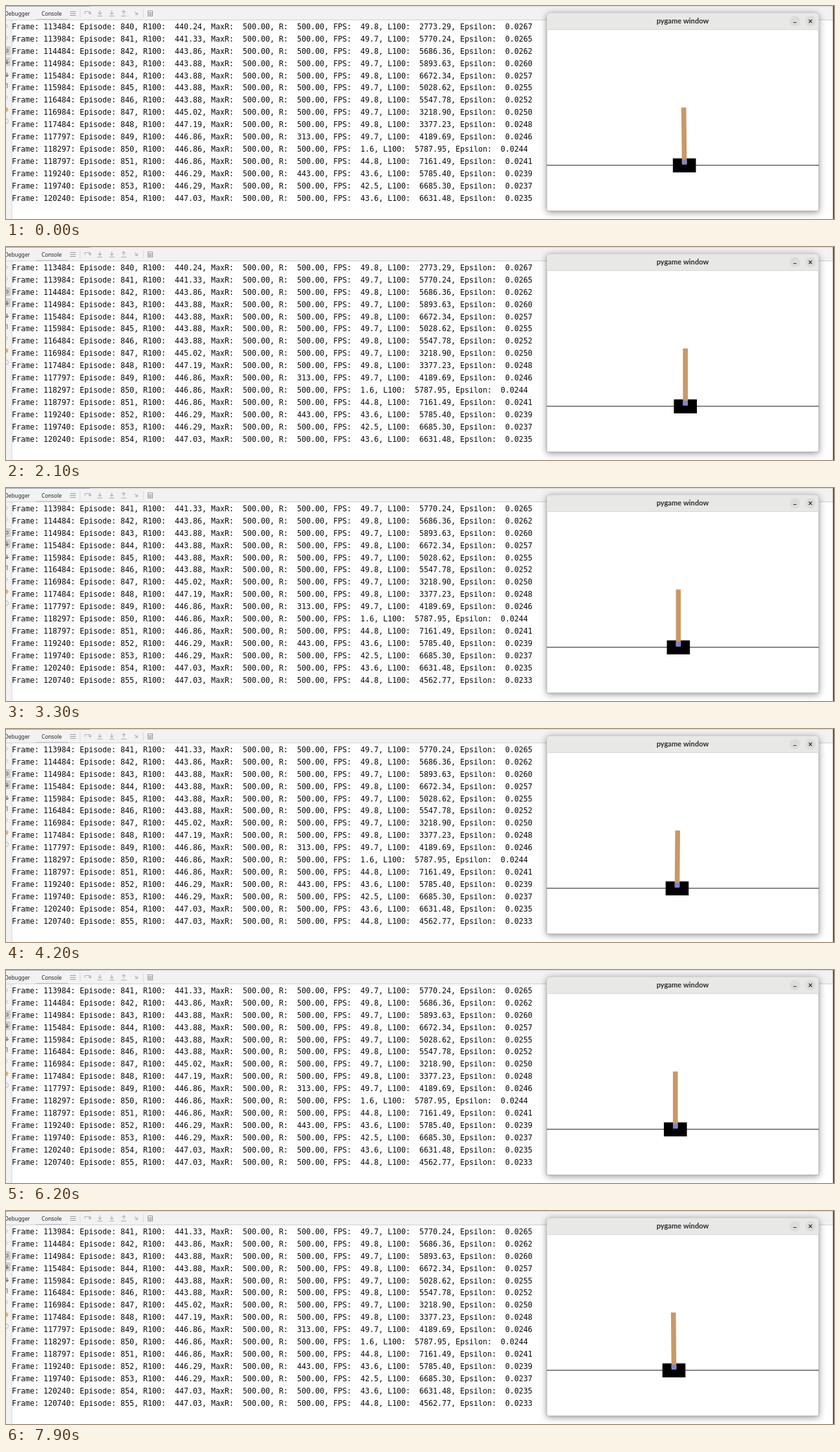
Write an HTML page with a canvas that moves like this. It is 1280 px wide and 329 px high and loops after 8 s.

```html
<!DOCTYPE html>
<html lang="en">
<head>
<meta charset="utf-8">
<title>Cart pole training</title>
<style>
  html, body { margin: 0; width: 100%; height: 100%; overflow: hidden; background: #fff; }
  canvas { display: block; }
</style>
</head>
<body>
<canvas id="stage" width="1280" height="329"></canvas>
<script>
const ctx = document.getElementById('stage').getContext('2d');
const LOOP = 8000, STEP = 100, RESET = 3100;
const VISIBLE_ROWS = 15;

function seeded(seed) {
  return () => (seed = (seed * 16807) % 2147483647) / 2147483647;
}

function framesPerSecond(episode) {
  if (episode < 850) return episode % 2 ? 49.7 : 49.8;
  if (episode === 850) return 1.6;
  return 43.65 + 1.15 * Math.cos((episode - 851) * Math.PI / 2);
}

// Every episode scores 500 unless listed; the mean runs over the last 100 episodes.
function trainingLog() {
  const FULL = 500, firstFrame = 113484;
  const shortRuns = { 849: 313, 852: 443 };
  const droppedRuns = { 841: 391, 842: 247, 843: 498, 847: 386, 848: 283, 849: 346, 854: 426 };
  const random = seeded(4711);
  const lines = [];
  let frame = firstFrame, mean = 440.24;
  for (let episode = 840; episode <= 855; episode++) {
    const reward = shortRuns[episode] || FULL;
    if (episode > 840) {
      frame += reward;
      mean += (reward - (droppedRuns[episode] || FULL)) / 100;
    }
    const loss = 2600 + 4700 * random();
    const epsilon = 0.02671 * Math.exp((firstFrame - frame) / 52500);
    lines.push(`Frame: ${frame}: Episode: ${episode}, R100:  ${mean.toFixed(2)}, MaxR:  500.00, ` +
      `R:  ${reward.toFixed(2)}, FPS:  ${framesPerSecond(episode).toFixed(1)}, ` +
      `L100:  ${loss.toFixed(2)}, Epsilon:  ${epsilon.toFixed(4)}`);
  }
  return lines;
}
const log = trainingLog();

// Cart centre and sideways offset of the pole tip.
function pose(t) {
  if (t < RESET) return { x: 1050.7 - 2 * Math.exp(-t / 1400), lean: -Math.exp(-t / 400) };
  const s = (t - RESET) / 1000;
  return {
    x: 38.8 + 1000 - 1.3 * s + 1.3 * Math.exp(-2 * s),
    lean: 0.9 * Math.sin(Math.PI * (s - 0.2) / 2.9)
  };
}

function rect(color, x, y, w, h) {
  ctx.fillStyle = color;
  ctx.fillRect(x, y, w, h);
}

function roundRect(color, x, y, w, h, radii) {
  ctx.fillStyle = color;
  ctx.beginPath();
  ctx.roundRect(x, y, w, h, radii);
  ctx.fill();
}

function disc(color, x, y, r) {
  ctx.fillStyle = color;
  ctx.beginPath();
  ctx.arc(x, y, r, 0, 2 * Math.PI);
  ctx.fill();
}

function stroke(color, width, ...lines) {
  ctx.strokeStyle = color;
  ctx.lineWidth = width;
  ctx.beginPath();
  for (const points of lines) points.forEach(([x, y], i) => i ? ctx.lineTo(x, y) : ctx.moveTo(x, y));
  ctx.stroke();
}

function text(str, x, y, font, color, align = 'left') {
  ctx.font = font;
  ctx.fillStyle = color;
  ctx.textAlign = align;
  ctx.fillText(str, x, y);
}

function arrow(color, x, y, angle) {
  ctx.save();
  ctx.translate(x, y);
  ctx.rotate(angle);
  stroke(color, 1.2, [[0, -3], [0, 3]], [[-2.5, 0.5], [0, 3], [2.5, 0.5]]);
  ctx.restore();
}

function drawToolbar() {
  const gray = '#b4b4b4', font = '8.3px "Noto Sans", sans-serif';
  rect('#f2f2f2', 0, 0, 1280, 21);
  rect('#d4d4d4', 0, 0, 1280, 1);
  rect('#9ca4b0', 0, 0, 130, 1);
  rect('#d1d1d1', 0, 21, 1280, 1);
  rect('#c3cad4', 46, 20, 50, 1.5);
  text('Debugger', 37, 15, font, '#222', 'right');
  text('Console', 70.5, 15, font, '#222', 'center');
  for (let y = 8.5; y < 15; y += 3) stroke('#999', 1, [[99, y], [108, y]]);
  for (const x of [114, 212]) rect('#dadada', x, 5, 1, 13);

  stroke(gray, 1.2, [[122, 12], [122, 8.5], [130, 8.5], [130, 12]], [[127.5, 10], [130, 12.5], [132, 10]]);
  for (let i = 0; i < 3; i++) {
    const x = 145 + 18.5 * i;
    arrow(gray, x, 10, i === 2 ? Math.PI : 0);
    stroke(gray, 1.2, [[x - 4, 15.5], [x + 4, 15.5]]);
  }
  arrow(gray, 201, 11, -Math.PI / 4);

  ctx.strokeStyle = '#999';
  ctx.lineWidth = 1;
  ctx.strokeRect(219.5, 7.5, 7, 8);
  stroke('#999', 1, [[220, 10.5], [226, 10.5]], [[220, 13], [226, 13]], [[223, 10], [223, 15]]);
}

function drawGutter() {
  rect('#f2f2f2', 0, 22, 9, 307);
  rect('#d4d4d4', 8.5, 22, 1, 307);
  for (const y of [62, 79]) roundRect('#cfcfcf', -3, y, 10, 14, 2);
  stroke('#666', 1, [[0, 67], [3, 67], [3, 71], [0, 71]]);
  for (const y of [86, 106]) arrow('#666', 1.5, y, 0);
  stroke('#666', 1, [[0, 120], [2, 120], [2, 127]]);
  for (const y of [31, 49, 141]) stroke('#bbb', 1, [[0, y - 3], [3, y], [0, y + 3]]);
  disc('#e0b070', 0, 160, 3.5);
  disc('#bbb', 0, 178, 4);
  disc('#f2f2f2', 0, 178, 3);
}

function drawWindow() {
  const x = 836, y = 10.5, w = 420.5, corners = [6, 6, 0, 0];
  ctx.save();
  ctx.shadowColor = 'rgba(0,0,0,.45)';
  ctx.shadowBlur = 11;
  ctx.shadowOffsetY = 2;
  roundRect('#fff', x, y, w, 306, corners);
  ctx.restore();
  ctx.strokeStyle = '#aaa';
  ctx.lineWidth = 0.8;
  ctx.stroke();
  roundRect('#e8e8e7', x, y, w, 26, corners);
  rect('#d3d3d2', x, 36, w, 0.8);
  text('pygame window', 1046, 27.2, 'bold 11.1px Lato, sans-serif', '#2e2e2e', 'center');
  for (const cx of [1219.5, 1243.5]) disc('#dcdcdb', cx, 23.5, 8);
  stroke('#333', 1.2, [[1217, 25.5], [1222, 25.5]],
    [[1241, 21], [1246, 26]], [[1246, 21], [1241, 26]]);
}

function drawCartPole({ x, lean }) {
  const half = 3.8;
  rect('#111', 836, 245.5, 420.5, 1);
  rect('#000', x - 17.8, 235.4, 35.6, 21.6);
  ctx.fillStyle = '#ca9865';
  ctx.beginPath();
  ctx.moveTo(x - half, 244.8);
  ctx.lineTo(x - half + lean, 156.7);
  ctx.lineTo(x + half + lean, 156.7);
  ctx.lineTo(x + half, 244.8);
  ctx.fill();
  roundRect('#8184cb', x - half, 237.3, 2 * half, 7.6, 2);
}

function draw(now) {
  const t = Math.floor((now % LOOP) / STEP) * STEP;
  rect('#fff', 0, 0, 1280, 329);
  drawToolbar();
  drawGutter();
  const top = t < RESET ? 0 : 1;
  log.slice(top, top + VISIBLE_ROWS).forEach((line, i) =>
    text(line, 9, 35.9 + i * 18.9, '11.63px "DejaVu Sans Mono", monospace', '#080808'));
  drawWindow();
  drawCartPole(pose(t));
  rect('#333', 1278.5, 0, 1.5, 329);
}

const start = performance.now();
function tick() {
  draw(performance.now() - start);
  requestAnimationFrame(tick);
}
tick();
</script>
</body>
</html>
```
